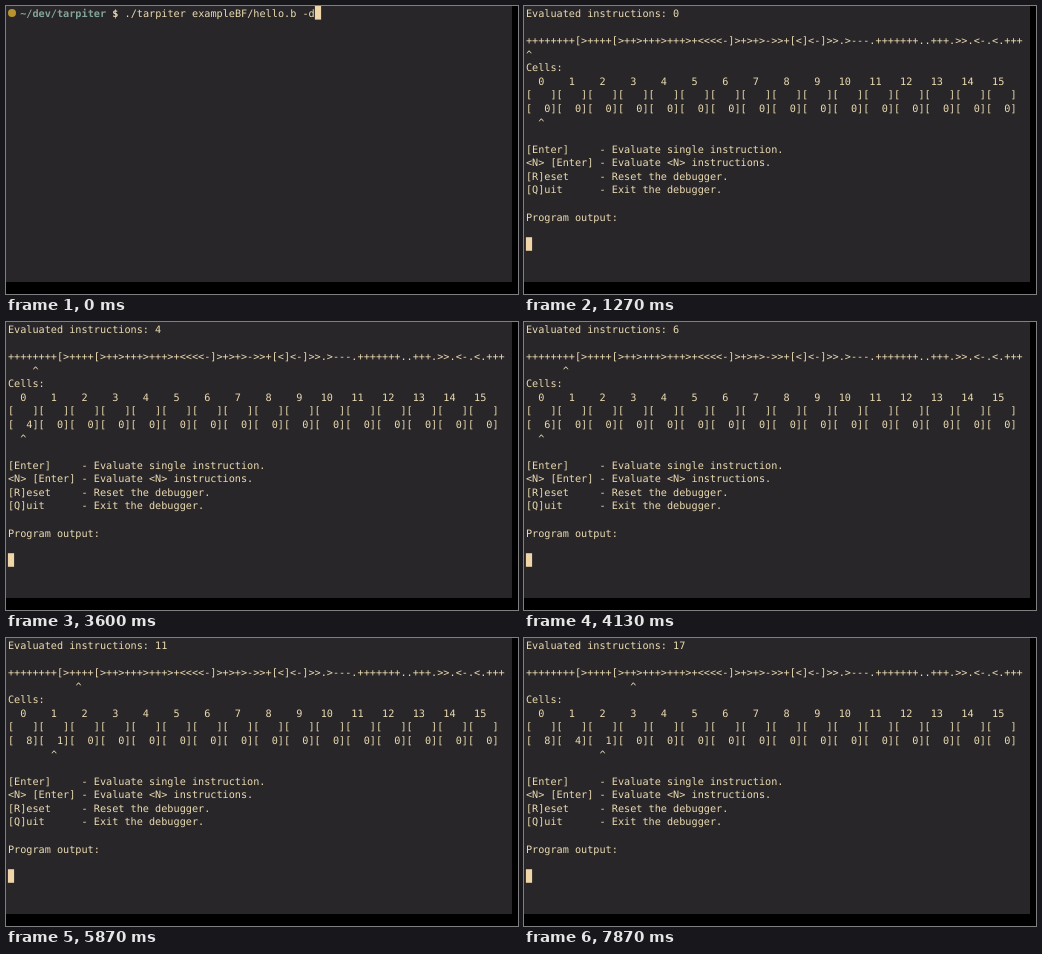
An HTML page that plays this animation: 512x288 px, repeating every 8 s.

```html
<!DOCTYPE html>
<html lang="en">
<head>
<meta charset="utf-8">
<title>Terminal debugger</title>
<style>
  html, body { margin: 0; width: 100%; height: 100%; overflow: hidden; background: #000; }
  svg { display: block; width: 100vw; height: 100vh; }
  text {
    font: 10.2px "DejaVu Sans Mono", "Noto Sans Mono", monospace;
    font-variant-ligatures: none;
    text-rendering: geometricPrecision;
    white-space: pre;
    fill: #ebdbb2;
  }
  .bold { font-weight: bold; }
  .path { fill: #83a598; }
</style>
</head>
<body>
<svg viewBox="0 0 512 288">
  <rect width="506" height="276" fill="#282628"/>
  <rect id="cursor" width="6.2" height="13.6" fill="#efd5a7"/>
  <g id="shell"><circle cx="6" cy="7" r="4" fill="#b8942f"/></g>
  <g id="debugger"></g>
</svg>
<script>
const LOOP = 8000;
const COL = 6.14, ROW = 13.6, LEFT = 1.9, BASELINE = 10.6;
const ENTER_AT = 1200, DEBUG_AT = 1270;
const ECHO = [3730, 3800];
const STEPS = [2930, 3200, 3400, 3600, 3800, 4130, 4330, 4600, 5070,
  5470, 5870, 6070, 6270, 6470, 6870, 7330, 7870];
const PROGRAM = "++++++++[>++++[>++>+++>+++>+<<<<-]>+>+>->>+[<]<-]>>.>---.+++++++..+++.>>.<-.<.+++";
const CELLS = 16;

const byId = id => document.getElementById(id);
const shell = byId("shell"), panel = byId("debugger"), cursor = byId("cursor");

function addText(parent, col, row, content = "", className = "") {
  const node = document.createElementNS("http://www.w3.org/2000/svg", "text");
  node.setAttribute("class", className);
  node.textContent = content;
  parent.append(node);
  moveText(node, col, row);
  return node;
}

function moveText(node, col, row) {
  node.setAttribute("x", LEFT + col * COL);
  node.setAttribute("y", BASELINE + row * ROW);
}

function moveCursor(col, row) {
  cursor.setAttribute("x", LEFT + col * COL);
  cursor.setAttribute("y", row * ROW);
}

const eachCell = format => Array.from({ length: CELLS }, (_, i) => format(i)).join("");

addText(shell, 2, 0, "~/dev/tarpiter", "bold path");
addText(shell, 17, 0, "$", "bold");
addText(shell, 19, 0, "./tarpiter exampleBF/hello.b -d");

const counter = addText(panel, 0, 0);
addText(panel, 0, 2, PROGRAM);
addText(panel, 0, 4, "Cells:");
addText(panel, 0, 5, eachCell(i => String(i).padStart(3) + "  "));
addText(panel, 0, 6, eachCell(() => "[   ]"));
const values = addText(panel, 0, 7);
[
  "[Enter]     - Evaluate single instruction.",
  "<N> [Enter] - Evaluate <N> instructions.",
  "[R]eset     - Reset the debugger.",
  "[Q]uit      - Exit the debugger."
].forEach((line, i) => addText(panel, 0, 10 + i, line));
addText(panel, 0, 15, "Program output:");

// Carets sit slightly lower than the font's own glyph.
const DROP = 0.06;
const codeCaret = addText(panel, 0, 3 + DROP, "^");
const cellCaret = addText(panel, 2, 8 + DROP, "^");

function evaluate(count) {
  const tape = Array(CELLS).fill(0);
  let pointer = 0;
  for (const op of PROGRAM.slice(0, count)) {
    if (op === "+") tape[pointer]++;
    if (op === ">") pointer++;
  }
  return { tape, pointer };
}

function showDebugger(count) {
  const { tape, pointer } = evaluate(count);
  counter.textContent = "Evaluated instructions: " + count;
  values.textContent = eachCell(i => "[" + String(tape[i]).padStart(3) + "]");
  moveText(codeCaret, count, 3 + DROP);
  moveText(cellCaret, 2 + 5 * pointer, 8 + DROP);
}

function render(time) {
  const debugging = time >= DEBUG_AT;
  shell.style.display = debugging ? "none" : "";
  panel.style.display = debugging ? "" : "none";
  if (debugging) {
    showDebugger(STEPS.filter(step => time >= step).length);
    const echoing = time >= ECHO[0] && time < ECHO[1];
    moveCursor(0, echoing ? 18 : 17);
  } else if (time >= ENTER_AT) {
    moveCursor(0, 1);
  } else {
    moveCursor(50, 0);
  }
}

const start = performance.now();
function tick() {
  render((performance.now() - start) % LOOP);
  requestAnimationFrame(tick);
}
tick();
</script>
</body>
</html>
```
